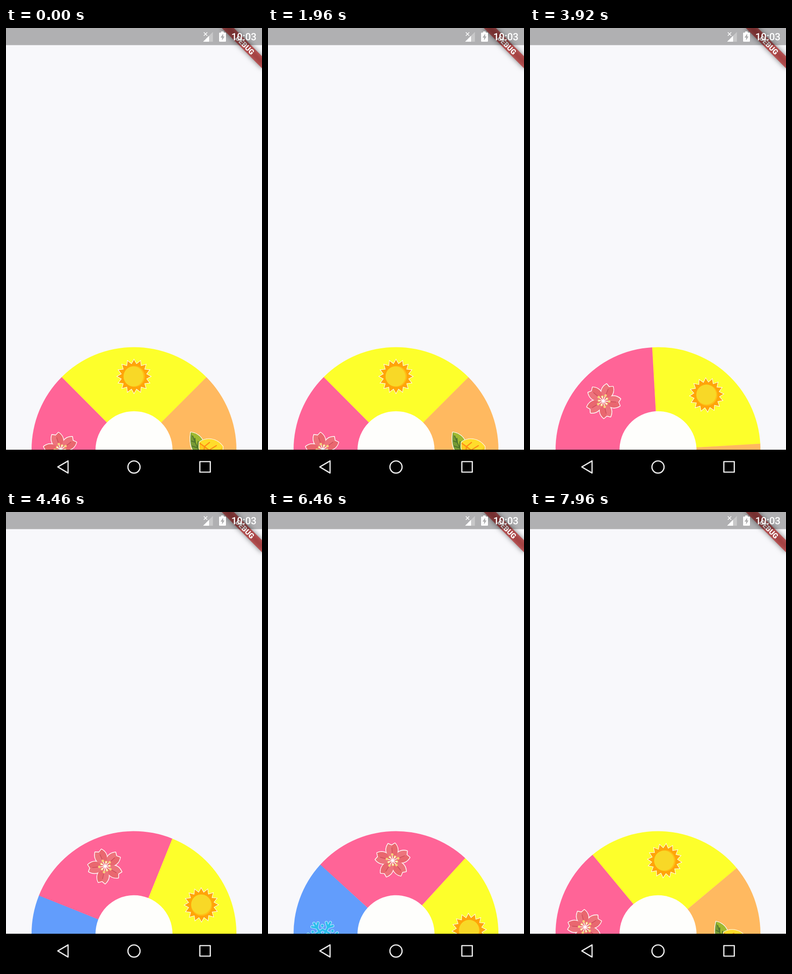
Write an HTML page with a canvas that moves like this. It is 561x998 px and loops after 8 s.

```html
<!DOCTYPE html>
<html lang="en">
<head>
<meta charset="utf-8">
<title>Season wheel</title>
<style>
html, body { margin: 0; width: 100%; height: 100%; overflow: hidden; background: #f8f8fb; }
canvas { display: block; width: 561px; height: 998px; }
</style>
</head>
<body>
<canvas id="stage" width="561" height="998"></canvas>
<script>
const ctx = document.getElementById('stage').getContext('2d');
const W = 561, H = 998, LOOP = 8000, DP = W / 360, TAU = Math.PI * 2;
const HUB = { x: 280.5, y: 923, outer: 224.5, inner: 84.3, icon: 160.5 };
const NAV_Y = 923, BAR_H = 37.5;

// Wheel turn in degrees at given times: drag forward, rest, drag back.
const TURN = [[0, 0], [2730, 0], [2880, 3.7], [3920, 41.6], [5000, 86.8],
  [5250, 90], [6330, 90], [6460, 87.4], [7960, 5.2], [8000, 4.6]];

const slope = i => i < 0 || i > TURN.length - 2 ? 0
  : (TURN[i + 1][1] - TURN[i][1]) / (TURN[i + 1][0] - TURN[i][0]);

// Harmonic mean keeps the curve free of overshoot.
function tangent(i) {
  const a = slope(i - 1), b = slope(i);
  return a * b > 0 ? 2 * a * b / (a + b) : 0;
}

function turnAt(t) {
  let i = 0;
  while (i < TURN.length - 2 && t >= TURN[i + 1][0]) i++;
  const [t0, v0] = TURN[i], [t1, v1] = TURN[i + 1];
  const d = t1 - t0, u = (t - t0) / d, w = 1 - u;
  return v0 * w * w * (1 + 2 * u) + v1 * u * u * (3 - 2 * u)
    + d * u * w * (tangent(i) * w - tangent(i + 1) * u);
}

const rad = deg => deg * Math.PI / 180;

function fill(color, path) { ctx.fillStyle = color; ctx.fill(path); }

function stroke(color, width, path) {
  ctx.strokeStyle = color;
  ctx.lineWidth = width;
  ctx.stroke(path);
}

function disc(x, y, r, color) {
  ctx.fillStyle = color;
  ctx.beginPath();
  ctx.arc(x, y, r, 0, TAU);
  ctx.fill();
}

function at(x, y, deg, draw) {
  ctx.save();
  ctx.translate(x, y);
  ctx.rotate(rad(deg));
  draw();
  ctx.restore();
}

function around(count, start, draw) {
  for (let i = 0; i < count; i++) at(0, 0, start + i * 360 / count, () => draw(i));
}

function starPath(points, outer, inner) {
  const p = new Path2D();
  for (let i = 0; i < points * 2; i++) {
    const a = i * Math.PI / points, r = i % 2 ? inner : outer;
    p.lineTo(Math.sin(a) * r, -Math.cos(a) * r);
  }
  p.closePath();
  return p;
}

const SUN_RAYS = starPath(16, 36.5, 27.5);

function sun() {
  ctx.lineJoin = 'miter';
  stroke('#fffbe8', 2.4, SUN_RAYS);
  fill('#ffa408', SUN_RAYS);
  disc(0.7, 0, 23, '#ffbf16');
  disc(-1.2, 0, 21.8, '#f8d827');
}

const PETAL = new Path2D('M0 0C-9 -8 -19 -22 -7.5 -37L0 -33L7.5 -37C19 -22 9 -8 0 0Z');
const PETAL_SHADE = new Path2D('M0 0L0 -33L7.5 -37C19 -22 9 -8 0 0Z');
const PETAL_VEIN = new Path2D('M0 -17V-28');
const STAMEN = new Path2D('M0 0V-10');

function blossom() {
  ctx.lineJoin = ctx.lineCap = 'round';
  around(5, -19, () => stroke('#fff5f5', 3.4, PETAL));
  around(5, -19, () => {
    fill('#ed737c', PETAL);
    fill('#e9676f', PETAL_SHADE);
    stroke('#c94c5b', 1.4, PETAL_VEIN);
  });
  around(10, -19, i => {
    if (i % 2) disc(0, -9.5, 2.7, '#f6d37c');
    else disc(0, -13, 2.7, '#f6d37c');
  });
  around(10, -19, () => stroke('#ffffff', 1.6, STAMEN));
}

const GREEN_LEAF = new Path2D('M-36 -38C-20 -36 -3 -23 -8 2L-16 13C-37 6 -39 -17 -36 -38Z');
const GREEN_HALF = new Path2D('M-36 -38C-20 -36 -3 -23 -8 2L-16 13Z');
const GREEN_VEINS = new Path2D('M-32 -30L-14 13M-26 -16L-27 -25M-26 -16L-34 -19M-21 -4L-20 -18M-21 -4L-33 -8M-18 4L-10 -9');
const GOLD_LEAF = new Path2D('M-17 -16C-2 -28 21 -25 34 -7C35 12 22 31 6 33C-10 26 -19 6 -17 -16Z');
const GOLD_HALF = new Path2D('M-17 -16C-2 -28 21 -25 34 -7L18 9Z');
const GOLD_VEINS = new Path2D('M-16 -14L22 14M-6 -7L5 -16M-6 -7L-8 8M4 1L20 -9M4 1L3 17M13 8L29 1');

function leaves() {
  ctx.lineJoin = ctx.lineCap = 'round';
  stroke('#fffbee', 3, GREEN_LEAF);
  fill('#779b35', GREEN_LEAF);
  fill('#a0ba31', GREEN_HALF);
  stroke('#4f742d', 2.2, GREEN_VEINS);
  stroke('#fff7d8', 3, GOLD_LEAF);
  fill('#ffc91f', GOLD_LEAF);
  fill('#ffdc2b', GOLD_HALF);
  stroke('#ff8d18', 2.4, GOLD_VEINS);
}

const SNOW_ARM = new Path2D('M0 0V-36M0 -24L-8 -32M0 -24L8 -32M-8 -14H8');

function snowflake() {
  ctx.lineJoin = ctx.lineCap = 'round';
  around(6, 0, () => stroke('#c5f2ff', 6.4, SNOW_ARM));
  around(6, 0, () => stroke('#2dbdec', 4.4, SNOW_ARM));
  around(6, 30, () => {
    disc(0, -25, 3.8, '#c5f2ff');
    disc(0, -25, 2.9, '#2dbdec');
  });
  disc(0, 0, 6, '#57d2f4');
}

const SEASONS = [
  { color: '#fdff2b', icon: sun },
  { color: '#ffb960', icon: leaves },
  { color: '#629dfc', icon: snowflake },
  { color: '#ff6497', icon: blossom }
];

function wheel(turn) {
  at(HUB.x, HUB.y, turn, () => {
    SEASONS.forEach(({ color, icon }, i) => at(0, 0, i * 90, () => {
      ctx.fillStyle = color;
      ctx.beginPath();
      ctx.arc(0, 0, HUB.outer, rad(-135), rad(-44.9));
      ctx.arc(0, 0, HUB.inner - 1, rad(-44.9), rad(-135), true);
      ctx.fill();
      at(0, -HUB.icon, -i * 90, icon);
    }));
    disc(0, 0, HUB.inner, '#fefefc');
  });
}

function banner() {
  at(W, 0, 45, () => {
    const x = -40 * DP, y = 28 * DP, w = 80 * DP, h = 12 * DP;
    ctx.save();
    ctx.shadowColor = 'rgba(0,0,0,.5)';
    ctx.shadowBlur = 12;
    ctx.shadowOffsetX = 2000;
    ctx.fillStyle = '#000';
    // Only the shadow lands on the stage.
    const off = 2000 * Math.SQRT1_2;
    ctx.fillRect(x - off, y + off, w, h);
    ctx.restore();
    ctx.fillStyle = 'rgba(183,28,28,.63)';
    ctx.fillRect(x, y, w, h);
    ctx.fillStyle = '#fff';
    ctx.font = `900 ${10.2 * DP}px Roboto, sans-serif`;
    ctx.textAlign = 'center';
    ctx.textBaseline = 'alphabetic';
    ctx.fillText('DEBUG', 0, y + h / 2 + 3.65 * DP);
  });
}

const SIGNAL = new Path2D('M432 30L453.5 8.5V30Z');
const SIGNAL_ON = new Path2D('M432 30L445 17V30Z');
const NO_DATA = new Path2D('M433.5 9.5L441 17M441 9.5L433.5 17');
const BATTERY = new Path2D('M471.5 7.5H477V10H480.5Q482 10 482 11.5V28.5Q482 30 480.5 30H468.5Q467 30 467 28.5V11.5Q467 10 468.5 10H471.5Z');
const BOLT = new Path2D('M476 12.5L470 21H473.5V27L479 18.5H476Z');

function statusBar() {
  ctx.fillStyle = 'rgba(0,0,0,.29)';
  ctx.fillRect(0, 0, W, BAR_H);
  ctx.lineCap = 'butt';
  fill('rgba(255,255,255,.3)', SIGNAL);
  fill('#fff', SIGNAL_ON);
  stroke('#fff', 1.6, NO_DATA);
  fill('#fff', BATTERY);
  fill('#b0b0b1', BOLT);
  ctx.fillStyle = '#fff';
  ctx.font = '500 21.8px Roboto, sans-serif';
  ctx.textAlign = 'right';
  ctx.textBaseline = 'alphabetic';
  ctx.fillText('10:03', 549, 27);
}

const BACK = new Path2D('M113.5 960.7L136 947.5V974Z');
const HOME = new Path2D();
HOME.arc(280.5, 960.8, 13.3, 0, TAU);
const RECENT = new Path2D('M424.8 949H447.7V972H424.8Z');

function navBar() {
  ctx.fillStyle = '#000';
  ctx.fillRect(0, NAV_Y, W, H - NAV_Y);
  ctx.lineJoin = 'round';
  for (const p of [BACK, HOME, RECENT]) stroke('#ebebeb', 2.7, p);
}

function frame(now) {
  ctx.fillStyle = '#f8f8fb';
  ctx.fillRect(0, 0, W, H);
  wheel(turnAt(now % LOOP));
  banner();
  statusBar();
  navBar();
  requestAnimationFrame(frame);
}
requestAnimationFrame(frame);
</script>
</body>
</html>
```
